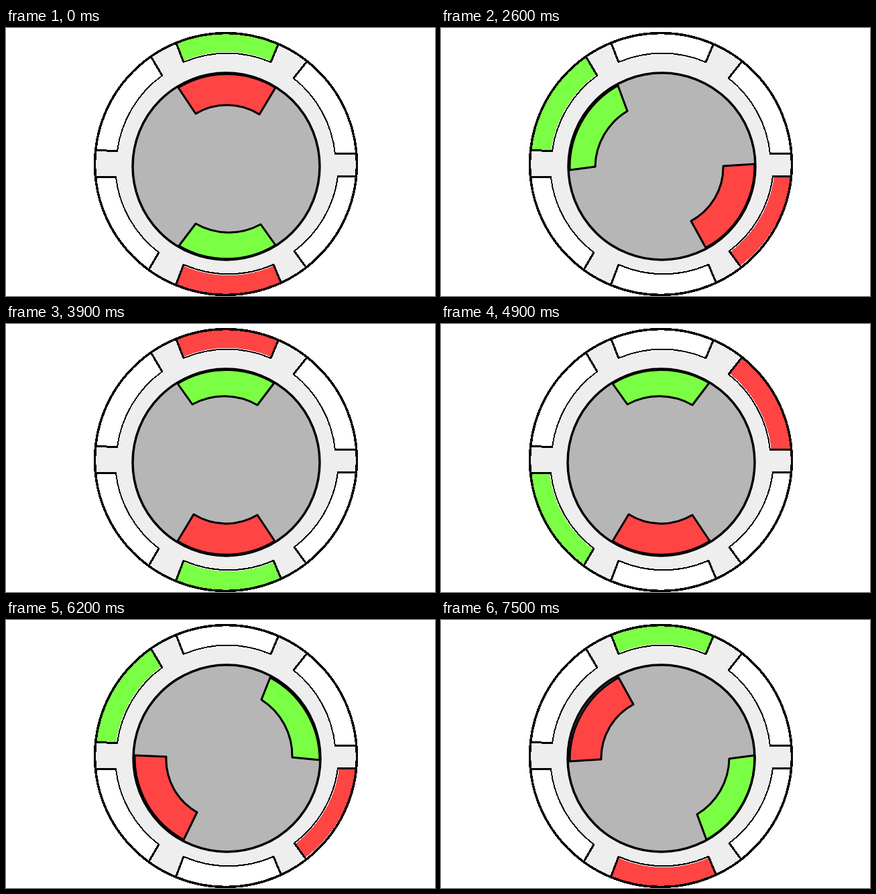
Animation, 640 px wide and 400 px high, one loop 7800 ms. Source, as an HTML page:

```html
<!DOCTYPE html>
<html>
<head>
<meta charset="utf-8">
<style>
  html, body { margin: 0; width: 100%; height: 100%; overflow: hidden; background: #fff; }
  svg { display: block; }
  path { stroke-linejoin: round; }
</style>
</head>
<body>
<svg width="640" height="400" viewBox="0 0 640 400" fill="none" stroke="#000">
  <g shape-rendering="crispEdges">
    <circle cx="328" cy="203" r="196" fill="#eee" stroke="none"/>
    <g id="cells"></g>
    <circle cx="328" cy="203" r="195.5" stroke-width="3.5"/>
  </g>
  <g id="rotor"></g>
</svg>
<script>
const RED = '#ff4444', GREEN = '#7bff44';
const LOOP = 7800, STEP = 1300, LEAD = 300; // the ring changes LEAD ms before the rotor
const cellsEl = document.getElementById('cells');
const rotorEl = document.getElementById('rotor');

// Corners in clockwise order: outer, inner, inner, outer. Cells start at the top.
const cells = [
  [254, 23, 265, 51, 395, 51, 406, 25],
  [449, 50, 429, 75, 491, 188, 522, 187],
  [522, 222, 495, 221, 430, 333, 446, 355],
  [410, 379, 399, 353, 265, 353, 254, 382],
  [214, 359, 228, 335, 164, 222, 134, 223],
  [134, 182, 166, 184, 233, 71, 217, 44]
];
const greenCell = [0, 1, 5, 3, 4, 5];

// Three rotor poses; the other three are the same turned by half a circle.
const poses = [
  { red: [257, 89, 283, 128, 378, 129, 402, 89],
    green: [402, 324, 380, 293, 283, 292, 258, 325], pivot: '329 206.5' },
  { red: [395, 86, 375, 127, 421, 210, 468, 212],
    green: [266, 328, 279, 295, 233, 209, 192, 205], pivot: '330 207' },
  { red: [468, 203, 421, 206, 373, 288, 395, 328],
    green: [192, 212, 230, 207, 278, 124, 264, 86], pivot: '330 207' }
];
const discX = [328.5, 329.5, 329.5, 328.5, 329.5, 328.5];

const arc = (r, sweep, x, y) => `A${r} ${r} 0 0 ${sweep} ${x} ${y}`;
const sector = ([a, b, c, d, e, f, g, h], inner, outer) =>
  `M${a} ${b}L${c} ${d}${arc(inner, 1, e, f)}L${g} ${h}${arc(outer, 0, a, b)}Z`;

function drawCell(p, i, green) {
  const fill = i === green ? GREEN : i === (green + 3) % 6 ? RED : '#fff';
  const [a, b, c, d, e, f, g, h] = p;
  const rim = `M${c} ${d}${arc(165, 1, e, f)}`;
  return `<path d="${sector(p, 165, 195.5)}" fill="${fill}" stroke="none"/>
    <path d="${rim}" stroke="#fff" stroke-width="4"/>
    <path d="${rim}" stroke-width="2"/>
    <path d="M${a} ${b}L${c} ${d}M${e} ${f}L${g} ${h}" stroke-width="3" stroke-linecap="round"/>`;
}

function drawRotor(i) {
  const { red, green, pivot } = poses[i % 3];
  const disc = `<circle cx="${discX[i]}" cy="206.5" r="139.5"`;
  return `${disc} fill="#b6b6b6" stroke="none"/>
    <g transform="rotate(${i < 3 ? 0 : 180} ${pivot})" stroke-width="3">
      <path d="${sector(red, 91, 139.5)}" fill="${RED}"/>
      <path d="${sector(green, 99, 139.5)}" fill="${GREEN}"/>
    </g>
    ${disc} stroke-width="3.5"/>`;
}

let shown = '';
function render(now) {
  const t = now % LOOP;
  const rotor = Math.floor(t / STEP);
  const ring = Math.floor((t + LEAD) / STEP) % 6;
  if (shown !== `${rotor},${ring}`) {
    shown = `${rotor},${ring}`;
    cellsEl.innerHTML = cells.map((p, i) => drawCell(p, i, greenCell[ring])).join('');
    rotorEl.innerHTML = drawRotor(rotor);
  }
}

const start = performance.now();
function frame() {
  render(performance.now() - start);
  requestAnimationFrame(frame);
}
frame();
</script>
</body>
</html>
```
